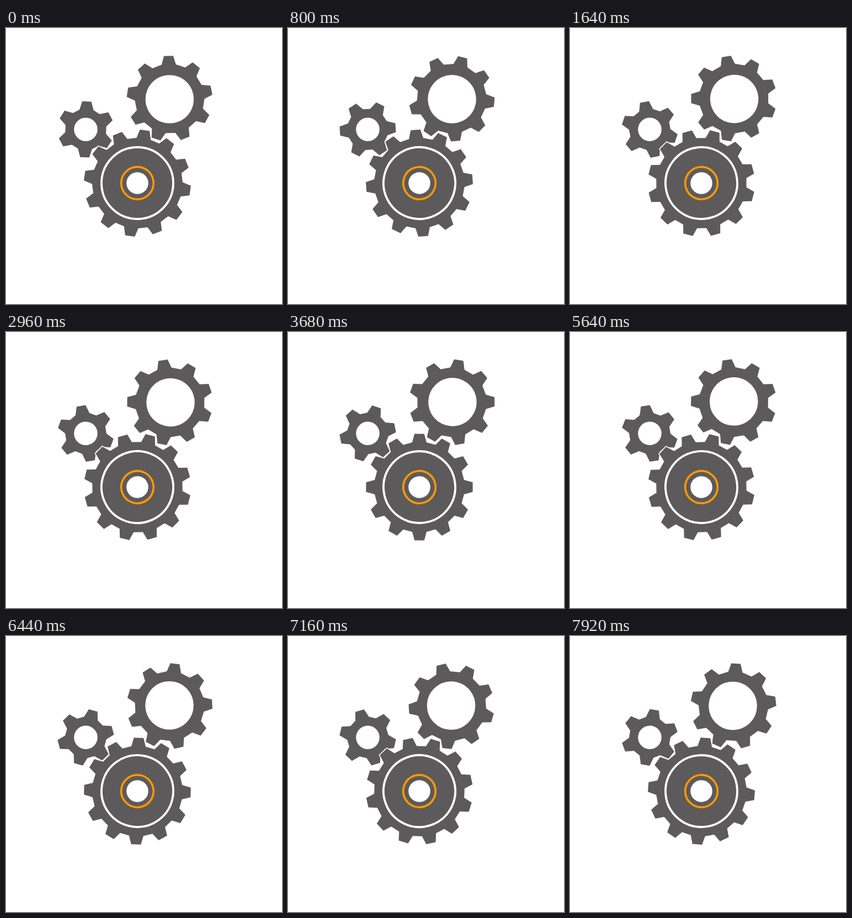
An HTML page with a canvas that plays this animation: 500x500 px, repeating every 8 s.

```html
<!DOCTYPE html>
<html>
<head>
<meta charset="utf-8">
<title>Gears</title>
<style>
html, body { margin: 0; width: 100%; height: 100%; overflow: hidden; background: #fff; }
canvas { display: block; }
</style>
</head>
<body>
<canvas id="stage" width="500" height="500"></canvas>
<script>
const ctx = document.getElementById('stage').getContext('2d');
const GRAY = '#5c5a5a', FRAME = 40, LOOP = 8000, LAST = 198;
const SPEED = 22.275; // degrees per second of the largest gear
const rad = deg => deg * Math.PI / 180;

// pivot x, y; offsets of rim and hole below the pivot; start angle; tooth and body sizes
const small = { x: 144.5, y: 183.7, rim: 0, off: 0, start: 2.2, teeth: 6, tip: 50.6, body: 37.5, half: 8.2, base: 12.8, hole: 21.3 };
const mid = { x: 296.4, y: 127.4, rim: 0.5, off: 1.65, start: -1.4, teeth: 9, tip: 77.3, body: 63, half: 8.4, base: 13, hole: 43.8 };
const big = { x: 238, y: 281, rim: 0, off: 0, start: 8, teeth: 12, tip: 96.6, body: 82, half: 8.8, base: 13, hole: 19.8, outline: 3 };

function disc(r, color) {
  ctx.beginPath();
  ctx.arc(0, 0, r, 0, 2 * Math.PI);
  ctx.fillStyle = color;
  ctx.fill();
}

function ring(r, width, color) {
  ctx.beginPath();
  ctx.arc(0, 0, r, 0, 2 * Math.PI);
  ctx.lineWidth = width;
  ctx.strokeStyle = color;
  ctx.stroke();
}

function rim(g) {
  const root = Math.sqrt(g.body ** 2 - g.base ** 2);
  ctx.save();
  ctx.translate(0, g.rim);
  ctx.rotate(rad(g.start));
  ctx.beginPath();
  for (let i = 0; i < g.teeth; i++) {
    ctx.lineTo(-g.base, -root);
    ctx.lineTo(-g.half, -g.tip);
    ctx.lineTo(g.half, -g.tip);
    ctx.lineTo(g.base, -root);
    ctx.rotate(2 * Math.PI / g.teeth);
  }
  ctx.closePath();
  if (g.outline) {
    ctx.lineWidth = g.outline;
    ctx.strokeStyle = '#fff';
    ctx.stroke();
  }
  ctx.fillStyle = GRAY;
  ctx.fill();
  ctx.restore();
}

function gear(g, turn) {
  ctx.save();
  ctx.translate(g.x, g.y);
  ctx.rotate(rad(turn));
  rim(g);
  ctx.translate(0, g.off);
  disc(g.hole, '#fff');
  if (g === big) {
    ring(65, 3.9, '#fff');
    ring(29.3, 3.7, '#ff9900');
  }
  ctx.restore();
}

const begin = performance.now();
function draw() {
  const step = Math.min(LAST, Math.floor((performance.now() - begin) % LOOP / FRAME));
  const turn = SPEED * step * FRAME / 1000;
  ctx.fillStyle = '#fff';
  ctx.fillRect(0, 0, 500, 500);
  for (const g of [small, mid]) gear(g, -turn * big.teeth / g.teeth);
  gear(big, turn);
  requestAnimationFrame(draw);
}
draw();
</script>
</body>
</html>
```
